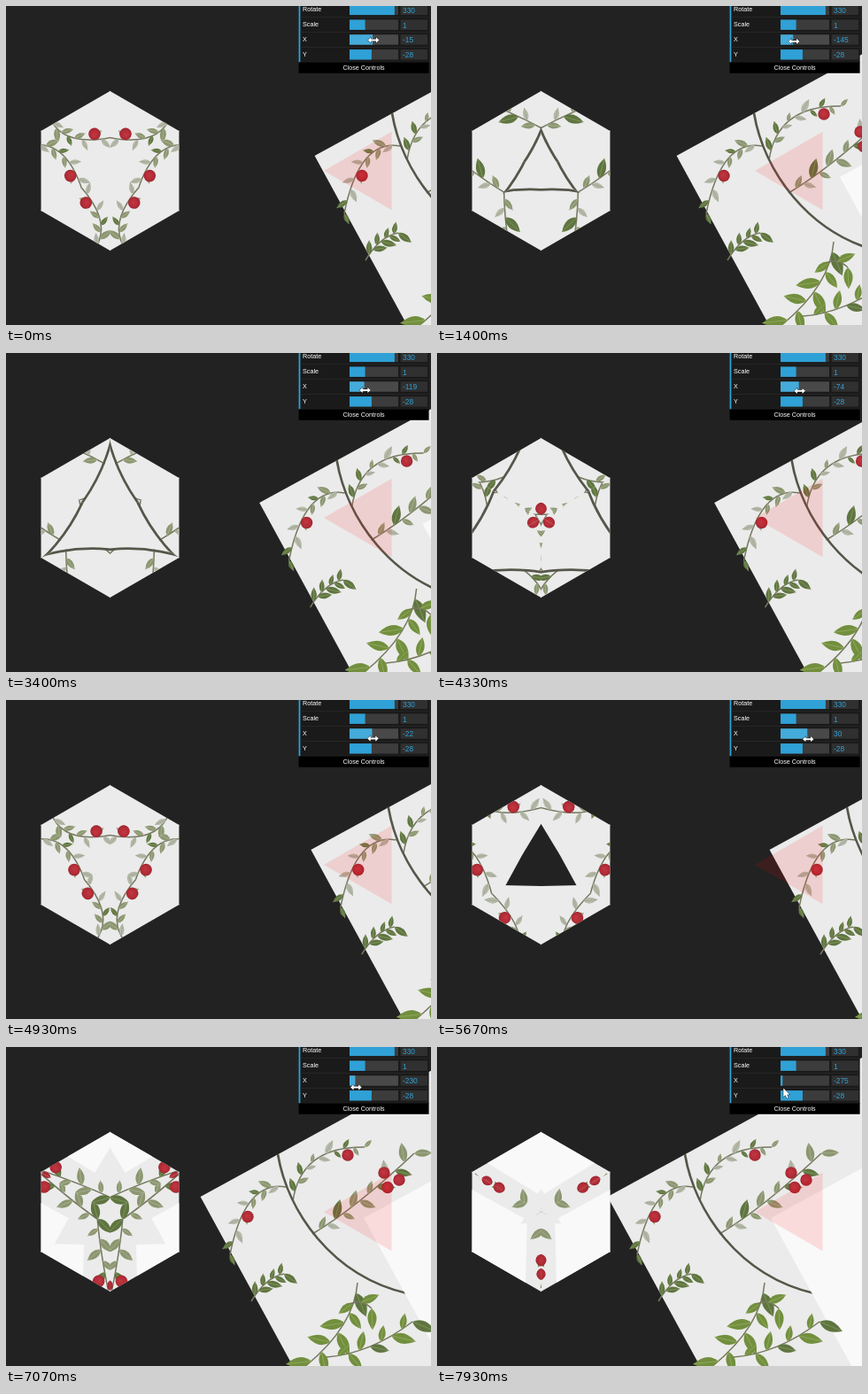
An HTML page with a canvas that plays this animation: 480 by 360 pixels, repeating every 8 s.

```html
<!DOCTYPE html>
<html lang="en">
<head>
<meta charset="utf-8">
<title>Kaleidoscope</title>
<style>
html, body { margin: 0; width: 100%; height: 100%; overflow: hidden; background: #222; }
canvas { display: block; }
</style>
</head>
<body>
<canvas id="stage" width="480" height="360"></canvas>
<script>
const ctx = document.getElementById('stage').getContext('2d');
const LOOP = 8000, FPS = 15;
const TILT = -0.5;                 // paper rotation in radians
const APEX = { x: 359, y: 186 };   // left tip of the sampling triangle
const SIDE = 88.4;
const HEX = { x: 117.5, y: 186, r: 90 };
const HEIGHT = Math.sqrt(3) / 2;   // of a triangle with side 1
const BLUE = '#2fa1d6';

// Turning points of the X slider drag: [ms, value]
const drag = [[0, -15], [1400, -145], [1470, -145], [2635, -245], [3400, -119],
  [4333, -74], [5667, 30], [6467, -145], [7867, -288], [7933, -275]];

// Smooth interpolation that never overshoots its keys
function follow(keys, t) {
  const last = keys.length - 1;
  const slope = i => (keys[i + 1][1] - keys[i][1]) / (keys[i + 1][0] - keys[i][0]);
  const tangent = i => {
    if (i === 0) return slope(0);
    if (i === last) return slope(last - 1);
    const a = slope(i - 1), b = slope(i);
    return a * b <= 0 ? 0 : 2 * a * b / (a + b);
  };
  if (t >= keys[last][0]) return keys[last][1];
  let i = 0;
  while (t >= keys[i + 1][0]) i++;
  const [t0, v0] = keys[i], [t1, v1] = keys[i + 1];
  const h = t1 - t0, s = (t - t0) / h, r = 1 - s;
  return v0 * r * r * (1 + 2 * s) + v1 * s * s * (3 - 2 * s)
    + h * s * r * (r * tangent(i) - s * tangent(i + 1));
}

function seeded(seed) {
  return () => (seed = (seed * 16807) % 2147483647) / 2147483647;
}

function polygon(points) {
  ctx.beginPath();
  points.forEach(([x, y]) => ctx.lineTo(x, y));
  ctx.closePath();
}

function box(color, x, y, w, h) {
  ctx.fillStyle = color;
  ctx.fillRect(x, y, w, h);
}

// A corner of a sheet that runs on past the stage
function sheet(x, y, color) {
  ctx.save();
  ctx.translate(x, y);
  ctx.rotate(TILT);
  box(color, 0, 0, 900, 900);
  ctx.restore();
}

// Leaf tones: [blade, midrib]
const PALE = ['#b4b9a8', '#98a08a'], SAGE = ['#8b9670', '#b0b89a'];
const OLIVE = ['#5f7540', '#8fa069'], FRESH = ['#728f3e', '#a0b56c'];

function drawLeaf({ x, y, angle, length, tone }) {
  const bulge = length * 0.42;
  ctx.save();
  ctx.translate(x, y);
  ctx.rotate(angle);
  ctx.beginPath();
  ctx.moveTo(0, 0);
  ctx.quadraticCurveTo(length * 0.4, -bulge, length, 0);
  ctx.quadraticCurveTo(length * 0.4, bulge, 0, 0);
  ctx.fillStyle = tone[0];
  ctx.fill();
  ctx.beginPath();
  ctx.moveTo(0, 0);
  ctx.lineTo(length, 0);
  ctx.strokeStyle = tone[1];
  ctx.lineWidth = 0.6;
  ctx.stroke();
  ctx.restore();
}

// A bent stem with leaves set alternately on both sides
function makeTwig(from, bend, to, count, size, tones, seed) {
  const random = seeded(seed);
  const leaves = Array.from({ length: count }, (_, i) => {
    const t = (i + 1) / count, r = 1 - t;
    const at = k => r * r * from[k] + 2 * r * t * bend[k] + t * t * to[k];
    const pull = k => r * (bend[k] - from[k]) + t * (to[k] - bend[k]);
    const spread = (i % 2 ? 1 : -1) * (0.6 + 0.5 * random());
    return {
      x: at(0), y: at(1),
      angle: Math.atan2(pull(1), pull(0)) + spread,
      length: size * (0.75 + 0.5 * random()),
      tone: tones[Math.floor(random() * tones.length)]
    };
  });
  return { from, bend, to, leaves };
}

const mixed = [PALE, SAGE, OLIVE], dark = [OLIVE], bright = [FRESH, FRESH, OLIVE];
const upperTwigs = [
  makeTwig([289, 158], [243, 150], [226, 234], 11, 14, mixed, 11),
  makeTwig([297, 174], [306, 112], [378, 113], 11, 14, mixed, 29),
  makeTwig([319, 211], [368, 182], [434, 120], 12, 19, mixed, 47),
  makeTwig([250, 287], [266, 260], [287, 256], 8, 15, dark, 5)
];
const lowerTwigs = [
  makeTwig([370, 266], [366, 318], [305, 365], 9, 24, bright, 83),
  makeTwig([362, 290], [374, 284], [386, 295], 2, 23, bright, 3),
  makeTwig([335, 350], [385, 346], [432, 310], 8, 23, bright, 61)
];

function drawTwig({ from, bend, to, leaves }) {
  ctx.beginPath();
  ctx.moveTo(...from);
  ctx.quadraticCurveTo(...bend, ...to);
  ctx.strokeStyle = '#75775f';
  ctx.lineWidth = 1.5;
  ctx.stroke();
  leaves.forEach(drawLeaf);
}

function drawBerry(x, y) {
  const shade = ctx.createRadialGradient(x - 1, y - 1, 1, x, y, 6.8);
  shade.addColorStop(0, '#bf3540');
  shade.addColorStop(0.75, '#b02a35');
  shade.addColorStop(1, '#96262e');
  ctx.beginPath();
  ctx.arc(x, y, 6.7, 0, 7);
  ctx.fillStyle = shade;
  ctx.fill();
}

function drawPlant(shift) {
  ctx.save();
  ctx.translate(shift, 0);
  sheet(192.6, 169, '#ebebeb');
  upperTwigs.forEach(drawTwig);
  [[246, 191.5], [359, 122], [400, 142], [404, 158.5], [417, 150]].forEach(p => drawBerry(...p));

  ctx.beginPath();
  ctx.moveTo(280, 121);
  ctx.bezierCurveTo(291, 185, 340, 258, 426, 278);
  ctx.strokeStyle = '#56564a';
  ctx.lineWidth = 2.7;
  ctx.stroke();

  sheet(377, 193, '#f9f9f9');
  lowerTwigs.forEach(drawTwig);
  ctx.restore();
}

// Six copies of the sampled triangle, every other one mirrored
function drawKaleidoscope(shift) {
  const zoom = HEX.r / SIDE, reach = HEX.r * HEIGHT, half = HEX.r / 2 + 0.5;
  for (let k = 0; k < 6; k++) {
    ctx.save();
    ctx.translate(HEX.x, HEX.y);
    ctx.rotate(k * Math.PI / 3);
    ctx.scale(1, k % 2 ? -1 : 1);
    polygon([[-1, 0], [reach, -half], [reach, half]]);
    ctx.clip();
    ctx.scale(zoom, zoom);
    ctx.translate(1 - APEX.x, -APEX.y);
    drawPlant(shift);
    ctx.restore();
  }
}

function drawSample() {
  const right = APEX.x + SIDE * HEIGHT;
  polygon([[APEX.x, APEX.y], [right, APEX.y - SIDE / 2], [right, APEX.y + SIDE / 2]]);
  ctx.fillStyle = 'rgba(255, 0, 0, 0.12)';
  ctx.fill();
}

function write(text, x, y, size, color, align = 'left') {
  ctx.font = `${size}px "Liberation Sans", Arial, sans-serif`;
  ctx.textAlign = align;
  ctx.fillStyle = color;
  ctx.fillText(text, x, y);
}

function drawPanel(x, dragging) {
  const rows = [['Rotate', 330, 0.925], ['Scale', 1, 0.32],
    ['X', x, (x + 300) / 600], ['Y', -28, 272 / 600]];
  box('#1a1a1a', 330.6, 0, 147, 64);
  box(BLUE, 330.6, 0, 1.8, 63.5);
  rows.forEach(([label, value, part], i) => {
    const y = 4.4 + i * 16.8, active = dragging && label === 'X';
    box('#2c2c2c', 332.4, y + 8, 145.2, 0.7);
    box(active ? '#494949' : '#3c3c3c', 388, y - 5.7, 55, 11.4);
    box(active ? '#44abda' : BLUE, 388, y - 5.7, 55 * part, 11.4);
    box('#303030', 445.6, y - 5.7, 30.4, 11.4);
    write(label, 335, y + 2, 7.2, '#fff');
    write(value, 448, y + 3.4, 8.4, BLUE);
  });
  box('#000', 330.6, 63.5, 147, 12.3);
  write('Close Controls', 404, 71.6, 7.2, '#fff', 'center');
}

function drawPointer(x, y, dragging) {
  const head = side => [[0, -1], [2.8, -1], [2.8, -3.2], [6.3, 0], [2.8, 3.2], [2.8, 1], [0, 1]]
    .map(([px, py]) => [px * side, py * side]);
  const arrow = [[0, 0], [0, 10], [2.3, 7.9], [3.9, 11.6], [5.6, 10.9], [4, 7.3], [7, 7.1]];
  ctx.save();
  ctx.translate(x, y);
  polygon(dragging ? [...head(1), ...head(-1)] : arrow);
  ctx.fillStyle = '#fff';
  ctx.strokeStyle = '#000';
  ctx.lineWidth = 0.8;
  ctx.stroke();
  ctx.fill();
  ctx.restore();
}

function draw(now) {
  const frame = Math.floor((now % LOOP + 4) * FPS / 1000);
  const t = frame * 1000 / FPS % LOOP;
  const dragging = t < 7900;
  // The slider moves in whole pointer pixels of 6.5 units
  const x = Math.floor(6.5 * Math.round((follow(drag, t) + 301) / 6.5) - 301);
  const shift = 0.6 * (x + 275);

  box('#222', 0, 0, 480, 360);
  drawPlant(shift);
  drawSample();
  drawKaleidoscope(shift);
  drawPanel(x, dragging);
  drawPointer(389 + (x + 300) / 600 * 55, 38.5 + t / 1000, dragging);
}

const start = performance.now();
function tick() {
  draw(performance.now() - start);
  requestAnimationFrame(tick);
}
tick();
</script>
</body>
</html>
```
